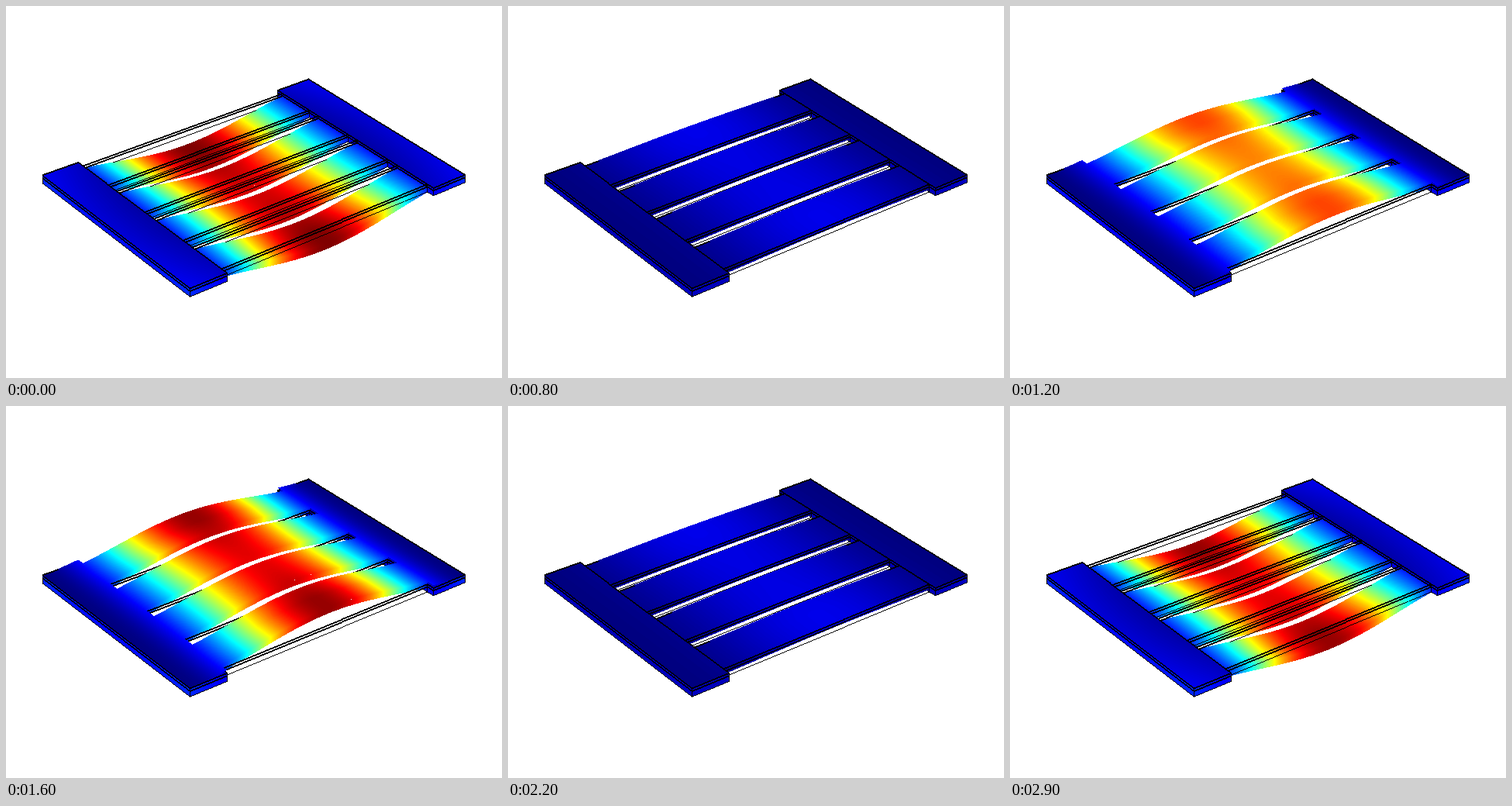
Write an HTML page with a canvas that moves like this. It is 640 px wide and 480 px high and loops after 3 s.

```html
<!DOCTYPE html>
<html lang="en">
<head>
<meta charset="utf-8">
<title>Vibrating slats</title>
<style>
  html, body { margin: 0; width: 100%; height: 100%; overflow: hidden; background: #fff; }
  canvas { display: block; width: 640px; height: 480px; }
</style>
</head>
<body>
<canvas id="stage" width="640" height="480"></canvas>
<script>
const W = 640, H = 480;
const STEP_MS = 100, STEPS = 30;
const THICK = 10.3, BAR_THICK = 7.5, LAYER = 3.3, SWING = 22, LINE_BIAS = 0.6;
const LEFT = 0.125, RIGHT = 0.875;
const BARS = [[0.035, 0.2175], [0.2775, 0.47], [0.53, 0.7225], [0.7825, 0.965]];
const BLOCKS = [[0, LEFT], [RIGHT, 1]];

const ctx = document.getElementById('stage').getContext('2d');
const image = ctx.createImageData(W, H);
const pixels = new Uint32Array(image.data.buffer);
const heights = new Float32Array(W * H);
const BLACK = 0xff000000, WHITE = 0xffffffff;

const clamp01 = n => Math.max(0, Math.min(1, n));
const mix = (a, b, t) => a + (b - a) * t;

// Rainbow scale, 0 = dark blue, 1 = dark red.
const palette = Uint32Array.from({ length: 257 }, (_, i) => {
  const channel = centre => Math.round(255 * clamp01(1.5 - Math.abs(4 * i / 256 - centre)));
  return (BLACK | channel(1) << 16 | channel(2) << 8 | channel(3)) >>> 0;
});

// Perspective view of the unit plate; z is height above its top face.
function project(x, y, z) {
  const w = 1 + 0.0858 * x - 0.0812 * y;
  return {
    x: (376.97 * x + 171.25 * y + 46.5) / w,
    y: (-115.98 * x + 116.48 * y + 217.5 - z) / w,
    z
  };
}

// Relative size of the movement: none at the outer ends, most in mid-span.
function modeShape(x, y) {
  const across = Math.min(1, 0.92 + 0.14 * (2 * y - 1) ** 2);
  return across * Math.sin(Math.PI * x) ** 2;
}

// Point of the moving sheet.
function sheetPoint(x, y, z, swing) {
  const move = modeShape(x, y) * swing;
  const point = project(x, y, z - move * SWING);
  point.value = Math.abs(move);
  return point;
}

// Point of the stiff end blocks, which stay in place and only change colour.
function blockPoint(x, y, z, swing) {
  const outward = Math.abs(2 * x - 1) * 4 - 3;
  const strain = 0.035 + 0.05 * outward + 0.03 * (2 * y - 1) ** 2;
  const point = project(x, y, z);
  point.value = Math.abs(swing) * strain;
  return point;
}

function triangle(a, b, c) {
  const area = (b.x - a.x) * (c.y - a.y) - (c.x - a.x) * (b.y - a.y);
  if (Math.abs(area) < 1e-6) return;
  const x0 = Math.max(0, Math.floor(Math.min(a.x, b.x, c.x)));
  const x1 = Math.min(W - 1, Math.ceil(Math.max(a.x, b.x, c.x)));
  const y0 = Math.max(0, Math.floor(Math.min(a.y, b.y, c.y)));
  const y1 = Math.min(H - 1, Math.ceil(Math.max(a.y, b.y, c.y)));
  for (let y = y0; y <= y1; y++) {
    for (let x = x0; x <= x1; x++) {
      const p = ((x - a.x) * (c.y - a.y) - (c.x - a.x) * (y - a.y)) / area;
      const q = ((b.x - a.x) * (y - a.y) - (x - a.x) * (b.y - a.y)) / area;
      if (p < -1e-6 || q < -1e-6 || p + q > 1.000001) continue;
      const r = 1 - p - q;
      const z = r * a.z + p * b.z + q * c.z;
      const i = y * W + x;
      // On any line of sight from above, the higher point is the nearer one.
      if (z < heights[i]) continue;
      heights[i] = z;
      const value = r * a.value + p * b.value + q * c.value;
      pixels[i] = palette[Math.round(256 * clamp01(value))];
    }
  }
}

function patch(columns, rows, pointAt) {
  for (let i = 0; i < columns; i++) {
    for (let j = 0; j < rows; j++) {
      const a = pointAt(i / columns, j / rows);
      const b = pointAt((i + 1) / columns, j / rows);
      const c = pointAt((i + 1) / columns, (j + 1) / rows);
      const d = pointAt(i / columns, (j + 1) / rows);
      triangle(a, b, c);
      triangle(a, c, d);
    }
  }
}

function topFace(place, [x0, x1], [y0, y1], swing, columns, rows) {
  patch(columns, rows, (u, v) => place(mix(x0, x1, u), mix(y0, y1, v), 0, swing));
}

function wall(place, x0, y0, x1, y1, thick, swing, tint = 0) {
  patch(48, 1, (u, v) => {
    const point = place(mix(x0, x1, u), mix(y0, y1, u), -thick * v, swing);
    point.value += tint;
    return point;
  });
}

// Straight pixel line, hidden where a face lies above it.
function edge(x0, y0, z0, x1, y1, z1, weight = 1) {
  const a = project(x0, y0, z0), b = project(x1, y1, z1);
  const count = Math.ceil(Math.max(Math.abs(b.x - a.x), Math.abs(b.y - a.y)));
  for (let k = 0; k <= count; k++) {
    const t = k / count;
    const x = Math.round(mix(a.x, b.x, t)), y = Math.round(mix(a.y, b.y, t));
    for (let row = 0; row < weight; row++) {
      const i = (y + row) * W + x;
      if (mix(a.z, b.z, t) + LINE_BIAS >= heights[i]) pixels[i] = BLACK;
    }
  }
}

function drawSolid(swing) {
  for (const block of BLOCKS) {
    topFace(blockPoint, block, [0, 1], swing, 10, 16);
    wall(blockPoint, block[0], 1, block[1], 1, THICK, swing, 0.05);
    wall(blockPoint, block[0], 0, block[0], 1, THICK, swing, 0.05);
    topFace(sheetPoint, block, [0, 1], swing, 10, 16);
  }
  for (const bar of BARS) {
    topFace(sheetPoint, [LEFT, RIGHT], bar, swing, 64, 4);
    wall(sheetPoint, LEFT, bar[1], RIGHT, bar[1], BAR_THICK, swing);
  }
}

// Outline of the plate at rest, heavier along its thin top layer.
function drawEdges() {
  const barEdges = BARS.flat();
  for (const z of [0, -LAYER, -THICK]) {
    const weight = z === -THICK ? 1 : 2;
    for (const x of BLOCKS.flat()) edge(x, 0, z, x, 1, z, weight);
    for (const y of [0, 1]) {
      for (const [x0, x1] of BLOCKS) edge(x0, y, z, x1, y, z, weight);
    }
    for (const y of barEdges) edge(LEFT, y, z, RIGHT, y, z, weight);
  }
  for (const x of BLOCKS.flat()) {
    for (const y of [0, 1]) edge(x, y, 0, x, y, -THICK);
  }
  for (const x of [LEFT, RIGHT]) {
    for (const y of barEdges) edge(x, y, 0, x, y, -THICK);
  }
}

function draw(step) {
  pixels.fill(WHITE);
  heights.fill(-1e9);
  drawSolid(Math.cos(2 * Math.PI * step / STEPS));
  drawEdges();
  ctx.putImageData(image, 0, 0);
}

let shown = 0;
const start = performance.now();

function tick() {
  const step = Math.floor((performance.now() - start) / STEP_MS) % STEPS;
  if (step !== shown) draw(shown = step);
  requestAnimationFrame(tick);
}

draw(0);
requestAnimationFrame(tick);
</script>
</body>
</html>
```
